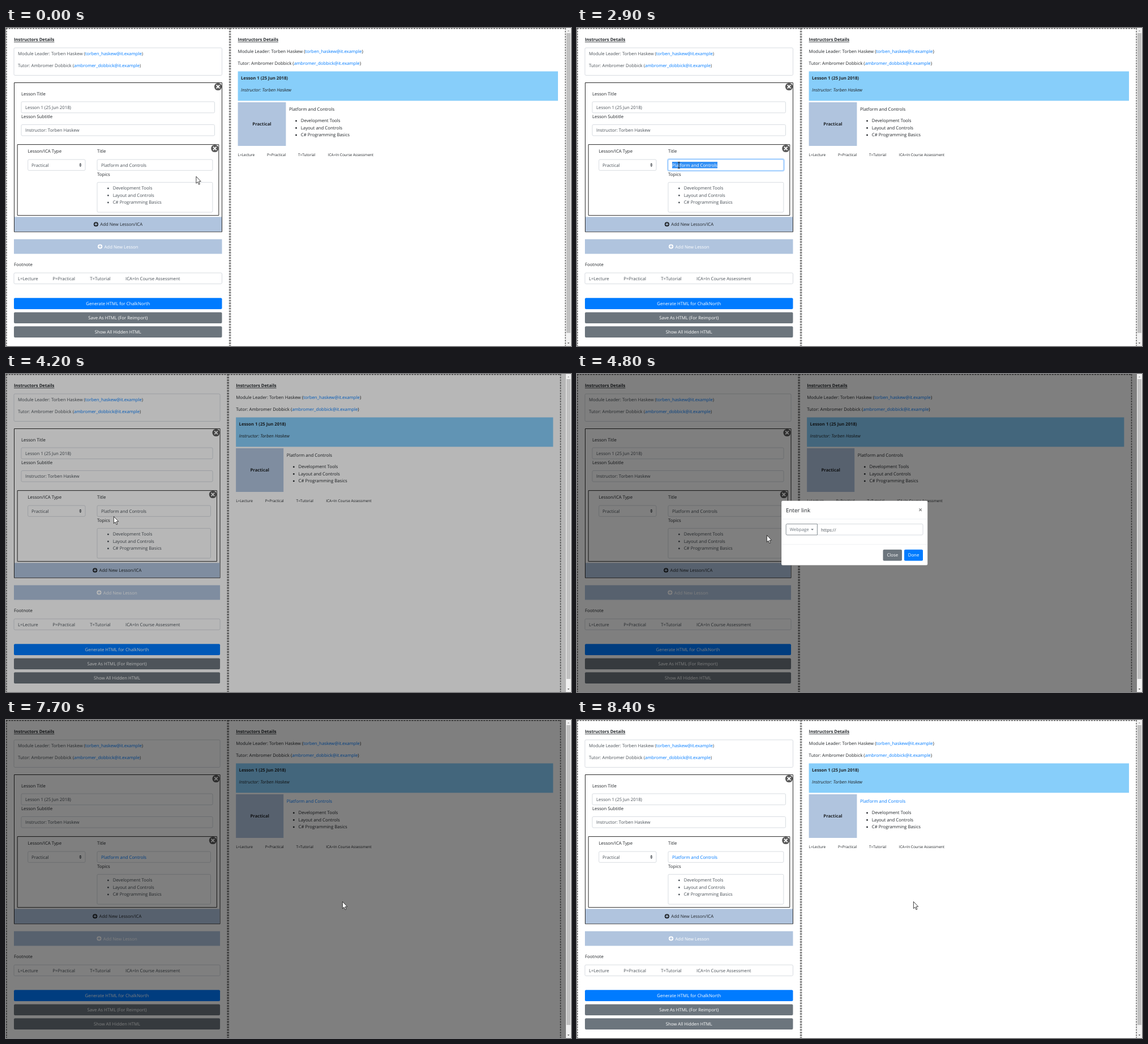
An HTML page with a canvas that plays this animation: 998x561 px, repeating every 10000 ms.

```html
<!DOCTYPE html>
<html lang="en">
<head>
<meta charset="utf-8">
<title>Lesson editor</title>
<style>
  html, body { margin: 0; width: 100%; height: 100%; overflow: hidden; background: #fff; }
  canvas { display: block; width: 998px; height: 561px; }
</style>
</head>
<body>
<canvas id="stage" width="998" height="561"></canvas>
<script>
const ctx = document.getElementById('stage').getContext('2d');
const LOOP = 10000, STEP = 100;
const FONT = '"Open Sans", "Noto Sans", sans-serif';
const SIZE = 7.8;
const INK = '#212529', FIELD = '#495057', BLUE = '#007bff', GRAY = '#6c757d';
const STEEL = '#b0c4de', EDGE = '#ced4da';

const people = [
  ['Module Leader: Torben Haskew (', 'torben_haskew@it.example'],
  ['Tutor: Ambromer Dobbick (', 'ambromer_dobbick@it.example']
];
const topics = ['Development Tools', 'Layout and Controls', 'C# Programming Basics'];
const notes = ['L=Lecture', 'P=Practical', 'T=Tutorial', 'ICA=In Course Assessment'];
const lessonTitle = 'Lesson 1 (25 Jun 2018)';
const lessonSub = 'Instructor: Torben Haskew';
const topicTitle = 'Platform and Controls';

// time, x, y
const path = [
  [0, 335.5, 261.5], [1000, 335.5, 261.5], [1900, 247, 242], [2100, 247, 242],
  [2600, 163, 242], [2900, 180, 242], [3000, 180, 242], [3200, 227, 287],
  [3300, 227, 287], [3900, 190, 251], [4400, 190, 251], [4800, 335, 284],
  [5400, 485, 277], [6700, 485, 277], [7300, 594, 320], [LOOP, 594, 320]
];

const ramp = (t, a, b) => Math.min(1, Math.max(0, (t - a) / (b - a)));
const ease = p => p * p * (3 - 2 * p);

function pointer(t) {
  let i = 1;
  while (path[i][0] < t) i++;
  const [t0, x0, y0] = path[i - 1], [t1, x1, y1] = path[i];
  const p = ease(ramp(t, t0, t1));
  return { x: x0 + (x1 - x0) * p, y: y0 + (y1 - y0) * p };
}

// y is the middle of the capitals
function text(str, x, y, color = INK, o = {}) {
  const size = o.size || SIZE;
  ctx.font = `${o.style || ''} ${o.weight || 400} ${size}px ${FONT}`;
  ctx.textAlign = o.align || 'left';
  ctx.fillStyle = color;
  ctx.fillText(str, x, y + size * 0.36);
  return ctx.measureText(str).width;
}

function rect(x0, y0, x1, y1, color) {
  ctx.fillStyle = color;
  ctx.fillRect(x0, y0, x1 - x0, y1 - y0);
}

function round(x0, y0, x1, y1, r, fill, stroke, width = 0.8) {
  ctx.beginPath();
  ctx.roundRect(x0, y0, x1 - x0, y1 - y0, r);
  if (fill) { ctx.fillStyle = fill; ctx.fill(); }
  if (stroke) { ctx.strokeStyle = stroke; ctx.lineWidth = width; ctx.stroke(); }
}

function field(x0, y0, x1, y1, focused) {
  if (focused) round(x0 - 1, y0 - 1, x1 + 1, y1 + 1, 3, null, 'rgba(0,123,255,.28)', 2);
  round(x0, y0, x1, y1, 2, '#fff', focused ? '#80bdff' : EDGE);
}

function button(x0, y0, x1, y1, color, label) {
  round(x0, y0, x1, y1, 2, color);
  text(label, (x0 + x1) / 2, (y0 + y1) / 2, '#fff', { align: 'center' });
}

function disc(x, y, r, color) {
  ctx.fillStyle = color;
  ctx.beginPath();
  ctx.arc(x, y, r, 0, 7);
  ctx.fill();
}

function poly(color, ...pts) {
  ctx.beginPath();
  pts.forEach(([x, y]) => ctx.lineTo(x, y));
  ctx.closePath();
  ctx.fillStyle = color;
  ctx.fill();
}

// plus or, turned by 45 degrees, a cross
function plus(x, y, r, color, width, angle = 0) {
  ctx.save();
  ctx.translate(x, y);
  ctx.rotate(angle);
  ctx.strokeStyle = color;
  ctx.lineWidth = width;
  ctx.beginPath();
  ctx.moveTo(-r, 0); ctx.lineTo(r, 0);
  ctx.moveTo(0, -r); ctx.lineTo(0, r);
  ctx.stroke();
  ctx.restore();
}

function closeIcon(x, y) {
  disc(x, y, 6.6, '#5a5a5a');
  plus(x, y, 4, '#fff', 1.9, Math.PI / 4);
}

function addBar(x0, y0, x1, y1, label, color, back) {
  rect(x0, y0, x1, y1, STEEL);
  ctx.font = `400 ${SIZE}px ${FONT}`;
  const w = ctx.measureText(label).width + 11.4;
  const x = (x0 + x1 - w) / 2, y = (y0 + y1) / 2;
  disc(x + 4.1, y, 4.1, color);
  plus(x + 4.1, y, 2.5, back, 1.3);
  text(label, x + 11.4, y + 0.4, color);
}

function heading(x) {
  const w = text('Instructors Details', x, 20.5, INK, { weight: 700, size: 7.7 });
  rect(x, 24.4, x + w, 25.2, INK);
}

function person([label, mail], x, y, color) {
  x += text(label, x, y, color);
  x += text(mail, x, y, BLUE);
  text(')', x, y, color);
}

function list(x, y, color) {
  topics.forEach((s, i) => {
    disc(x - 8.3, y + i * 12.5 + 0.4, 1.4, color);
    text(s, x, y + i * 12.5, color);
  });
}

function dashedBox(x0, x1) {
  ctx.strokeStyle = '#6f6f6f';
  ctx.lineWidth = 1.6;
  ctx.setLineDash([3.1, 1.6]);
  ctx.beginPath();
  ctx.moveTo(x0, 0.9); ctx.lineTo(x1, 0.9);
  ctx.moveTo(x0 + 0.9, 0); ctx.lineTo(x0 + 0.9, 561);
  ctx.moveTo(x1 - 0.9, 0); ctx.lineTo(x1 - 0.9, 561);
  ctx.stroke();
  ctx.setLineDash([]);
}

function selectTitle(x, y, mouseX) {
  ctx.font = `400 ${SIZE}px ${FONT}`;
  const at = n => x + ctx.measureText(topicTitle.slice(0, n)).width;
  let n = 0;
  while (n < topicTitle.length && at(n + 0.5) < mouseX) n++;
  const from = at(n), to = at(topicTitle.length);
  if (from >= to) return;
  rect(from, 236, to, 247.4, '#3390f5');
  ctx.save();
  ctx.beginPath();
  ctx.rect(from, 232, to - from, 20);
  ctx.clip();
  text(topicTitle, x, y, '#fff');
  ctx.restore();
}

function editor(t, split, linked) {
  const l = 14, r = split - 14.1, mid = 161;
  heading(l);
  field(l, 35, r, 83.5);
  person(people[0], 21, 45, FIELD);
  person(people[1], 21, 66, FIELD);

  round(l + 0.5, 96.5, r, 359.7, 0, '#fff', '#2b2b2b', 1);
  closeIcon(r - 7, 103.5);
  text('Lesson Title', 27, 115.7);
  field(27, 130, r - 13, 149.7);
  text(lessonTitle, 34, 140, FIELD);
  text('Lesson Subtitle', 27, 156.3);
  field(27, 170.5, r - 13, 190);
  text(lessonSub, 34, 180.6, FIELD);

  round(20.2, 205.6, r - 5.7, 330.6, 0, '#fff', '#2b2b2b', 1);
  closeIcon(r - 12.7, 212.5);
  text('Lesson/ICA Type', 38.5, 217.6);
  text('Title', mid, 217.6);
  field(38.7, 232, 140, 251.3);
  text('Practical', 45, 241.8, FIELD);
  poly('#343a40', [129.2, 240.9], [131.4, 238.4], [133.6, 240.9]);
  poly('#343a40', [129.2, 242.3], [131.4, 244.8], [133.6, 242.3]);
  const focused = t >= 2000 && t < 4100;
  field(mid, 232, r - 16.6, 251.3, focused);
  text(topicTitle, 168, 241.8, linked ? BLUE : FIELD);
  if (t >= 2100 && t < 4100) selectTitle(168, 241.8, t < 2600 ? pointer(t).x : 0);
  text('Topics', mid, 258.3);
  field(mid, 272.3, r - 16.6, 325);
  list(188.7, 282.5, FIELD);

  addBar(l + 1, 333.3, r - 0.5, 359.2, 'Add New Lesson/ICA', INK, STEEL);
  addBar(l, 372.6, r, 398.4, 'Add New Lesson', '#fff', STEEL);
  text('Footnote', l, 417.6);
  field(l, 432, r, 451.3);
  [21, 82.3, 148.3, 211].forEach((x, i) => text(notes[i], x, 442, FIELD));
  button(l, 476.3, r, 496, BLUE, 'Generate HTML for ChalkNorth');
  button(l, 501.4, r, 521, GRAY, 'Save As HTML (For Reimport)');
  button(l, 526.3, r, 545.9, GRAY, 'Show All Hidden HTML');
}

function preview(split, right, linked) {
  const l = split + 14, r = right - 14;
  const w = (r - l) * 0.15, x = l + w + 5.6;
  heading(l);
  person(people[0], l, 41.5, INK);
  person(people[1], l, 62.2, INK);
  rect(l, 76.5, r, 128.4, '#87cefa');
  text(lessonTitle, l + 5.4, 88.2, INK, { weight: 700, size: 7.7 });
  text(lessonSub, l + 5.4, 109, INK, { style: 'italic' });
  rect(l, 131, l + w, 208, STEEL);
  text('Practical', l + w / 2, 169.6, INK, { weight: 700, size: 7.7, align: 'center' });
  text(topicTitle, x, 142.7, linked ? BLUE : INK);
  list(x + 20.8, 163.5, INK);
  [0, 51.5, 106.4, 159].forEach((dx, i) => text(notes[i], l + dx, 223.7, INK, { size: 6.5 }));
}

function modal(t, alpha, dy) {
  ctx.save();
  ctx.globalAlpha = alpha;
  ctx.translate(0, dy);
  round(361, 223.4, 619.4, 337.4, 2.5, '#fff', 'rgba(0,0,0,.2)');
  text('Enter link', 369, 240, INK, { size: 9.8, weight: 500 });
  plus(606.6, 239.6, 3.1, '#7f7f7f', 1.3, Math.PI / 4);
  rect(361.4, 255.6, 619, 256.3, '#e9ecef');
  rect(361.4, 300.4, 619, 301.1, '#e9ecef');
  const focused = t >= 5400;
  field(424.6, 264.6, 611, 284, focused);
  round(369.2, 264.6, 424.4, 284, [2, 0, 0, 2], '#fff', GRAY);
  text('Webpage', 375.7, 274.6, GRAY);
  poly(GRAY, [413.2, 273.2], [418, 273.2], [415.6, 275.7]);
  if (t < 6200) {
    const w = text('https://', 431, 275, FIELD);
    if (focused && t < 5900) rect(431.4 + w, 269.5, 432.1 + w, 280.5, '#222');
  } else {
    text('dia.org/wiki/C_Sharp_(programming_language)', 431, 275, FIELD);
    rect(431.5, 279.6, 457.5, 280.2, '#8a8f94');
  }
  button(540.5, 309.8, 574, 329.4, GRAY, 'Close');
  button(578, 309.8, 611, 329.4, BLUE, 'Done');
  ctx.restore();
}

function scrollbar() {
  rect(989, 0, 998, 561, '#f1f1f1');
  rect(990, 9, 997, 538, '#c1c1c1');
  poly('#a3a3a3', [991.7, 6], [993.5, 4], [995.3, 6]);
  poly('#505050', [991.7, 555], [993.5, 557], [995.3, 555]);
}

function drawPointer(t) {
  const { x, y } = pointer(t);
  const over = (x0, y0, x1, y1) => x >= x0 && x <= x1 && y >= y0 && y <= y1;
  const beam = t < 4100
    ? over(161, 232, 365, 251) && t < 3400 || over(161, 272, 365, 325)
    : t < 7400 && over(424, 264, 611, 284);
  ctx.save();
  ctx.translate(x, y);
  if (beam) {
    ctx.strokeStyle = '#222';
    ctx.lineWidth = 1;
    ctx.beginPath();
    ctx.moveTo(0, -5); ctx.lineTo(0, 5);
    ctx.moveTo(-2, -5.3); ctx.lineTo(2, -5.3);
    ctx.moveTo(-2, 5.3); ctx.lineTo(2, 5.3);
    ctx.stroke();
  } else {
    poly('#fff', [0.4, 0.4], [0.4, 12.6], [3.1, 10.1], [5, 14.6], [6.9, 13.8], [5, 9.4], [8.7, 9.2]);
    ctx.strokeStyle = '#111';
    ctx.lineWidth = 0.8;
    ctx.stroke();
  }
  ctx.restore();
}

function draw(t) {
  const shifted = t >= 4100 && t < 7900;
  const right = shifted ? 980.4 : 989;
  const split = right * 0.4;
  const linked = t >= 7500;
  rect(0, 0, 998, 561, '#fff');
  dashedBox(0, split);
  dashedBox(split, right);
  editor(t, split, linked);
  preview(split, right, linked);

  const dim = 0.5 * (t < 6000 ? ramp(t, 4115, 4265) : 1 - ramp(t, 7700, 7850));
  if (dim) {
    // the backdrop is already two thirds gone one step after it starts to fade
    rect(0, 0, 989, 561, `rgba(0,0,0,${dim})`);
  }
  scrollbar();
  const show = t < 6000 ? ease(ramp(t, 4220, 4480)) : 1 - ease(ramp(t, 7400, 7700));
  if (show) modal(t, show, -90 * (1 - show));
  drawPointer(t);
}

const start = performance.now();
function tick() {
  const t = (performance.now() - start) % LOOP;
  ctx.textRendering = 'geometricPrecision';
  draw(Math.floor(t / STEP) * STEP);
  requestAnimationFrame(tick);
}
tick();
</script>
</body>
</html>
```
